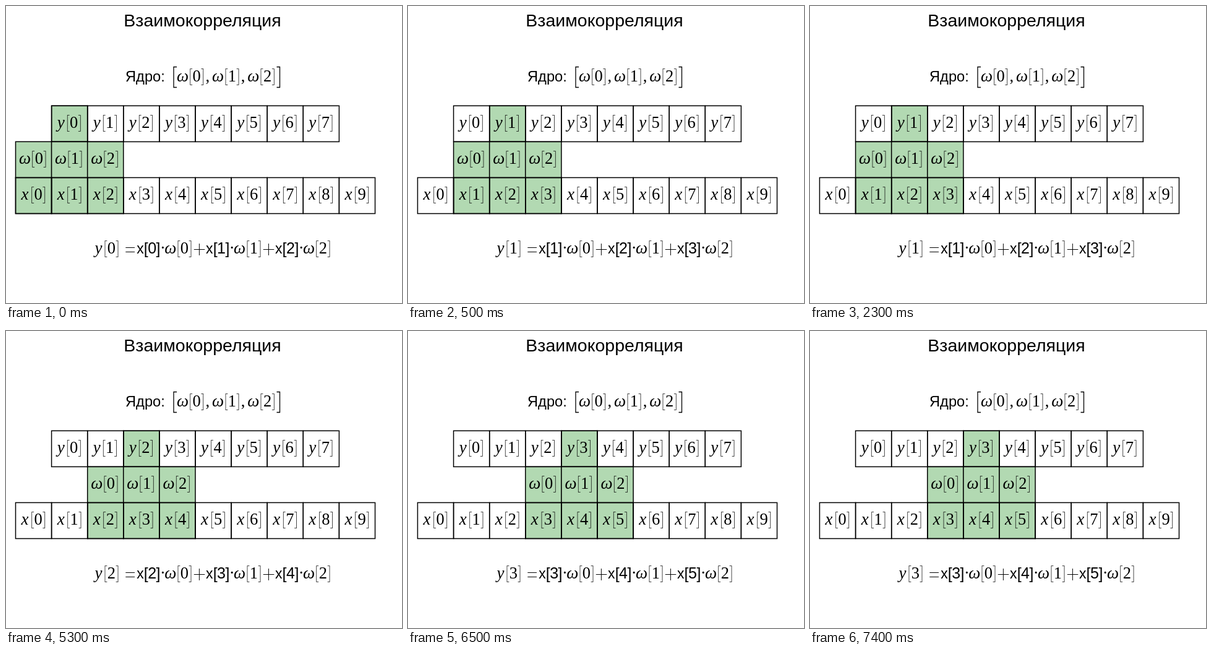
These frames come from a looping animation (640 by 480 pixels, 8 s). An HTML page:

```html
<!DOCTYPE html>
<html lang="ru">
<head>
<meta charset="utf-8">
<title>Взаимокорреляция</title>
<style>
  html, body { margin: 0; width: 100%; height: 100%; overflow: hidden; background: #fff; }
  svg { display: block; width: 640px; height: 480px; }
  text { font: 26.5px "Liberation Serif", serif; white-space: pre; }
  .var { font-size: 27px; font-style: italic; }
  .fence { font: 200 27px Roboto, sans-serif; }
  .op { font: 200 36px Roboto, sans-serif; }
  .sans { font: 25px "Liberation Sans", sans-serif; }
  .sansVar { font: 23px "Liberation Sans", sans-serif; }
  .mid { text-anchor: middle; }
  .cell { fill: none; stroke: #000; stroke-width: 1.5; }
  .on { fill: #b2d9b2; }
</style>
</head>
<body>
<svg id="stage" viewBox="0 0 640 480">
  <text class="sans mid" x="317.5" y="33" style="font-size:28.5px">Взаимокорреляция</text>
  <text class="sans" x="193" y="122" style="font-size:23.7px">Ядро:</text>
  <path d="M276 98.5h-5v33h5M437.5 98.5h5v33h-5" fill="none" stroke="#000" stroke-width="1.3"/>
</svg>
<script>
const stage = document.getElementById('stage');
const EM = 26.5, CELL = 58.1, LEFT = 15.5;
const ROWS = { y: 161.3, ω: 219.3, x: 277.4 };

// Advance in em, class and baseline shift of each math glyph
const MATH = {
  x: [.572, 'var', 0], y: [.526, 'var', 0], ω: [.658, 'var', 0],
  '[': [.278, 'fence', 2.2], ']': [.278, 'fence', 2.2],
  '+': [.778, 'op', 5.5], '=': [.778, 'op', 6],
  '·': [.278, '', 0], ',': [.445, '', 0], ' ': [.23, '', 0]
};
const SANS = { x: [.435, 'sansVar', 0], '[': [.27, 'sans', 1], ']': [.27, 'sans', 1] };
const metric = (ch, sans) => sans
  ? SANS[ch] || [.478, 'sans', 0]
  : MATH[ch] || [.5, '', 0];

function add(parent, tag, attrs) {
  const el = document.createElementNS('http://www.w3.org/2000/svg', tag);
  for (const key in attrs) el.setAttribute(key, attrs[key]);
  return parent.appendChild(el);
}

const width = str => [...str].reduce((sum, ch) => sum + metric(ch)[0] * EM, 0);

// Sets a run glyph by glyph and returns its right end
function setRun(parent, str, x, y, sans) {
  const line = add(parent, 'text', { class: 'mid' });
  for (const ch of str) {
    const [adv, cls, shift] = metric(ch, sans);
    const mid = ch === ',' ? .139 : adv / 2;
    add(line, 'tspan', { class: cls, x: x + mid * EM, y: y + shift }).textContent = ch;
    x += adv * EM;
  }
  return x;
}

function cell(parent, row, col, on) {
  add(parent, 'rect', {
    class: on ? 'cell on' : 'cell',
    x: LEFT + col * CELL, y: ROWS[row], width: CELL, height: CELL
  });
}

function label(parent, row, col, index) {
  const str = `${row}[${index}]`;
  setRun(parent, str, LEFT + (col + .5) * CELL - width(str) / 2, ROWS[row] + 35.7);
}

setRun(stage, 'ω[0],ω[1],ω[2]', 276.7, 122);

const kernel = add(stage, 'g');
cell(kernel, 'y', 1, true);
for (let i = 0; i < 3; i++) {
  cell(kernel, 'x', i, true);
  cell(kernel, 'ω', i, true);
  label(kernel, 'ω', i, i);
}
for (let i = 0; i < 10; i++) {
  cell(stage, 'x', i);
  label(stage, 'x', i, i);
}
for (let i = 0; i < 8; i++) {
  cell(stage, 'y', i + 1);
  label(stage, 'y', i + 1, i);
}

const formula = add(stage, 'g');
function show(step) {
  kernel.setAttribute('transform', `translate(${step * CELL})`);
  formula.replaceChildren();
  let x = setRun(formula, `y[${step}] =`, 142.5, 400);
  for (let i = 0; i < 3; i++) {
    x = setRun(formula, `x[${step + i}]`, x, 400, true);
    x = setRun(formula, `·ω[${i}]` + (i < 2 ? '+' : ''), x, 400);
  }
}

let shown = 0;
const start = performance.now();
function tick() {
  const t = (performance.now() - start) % 8000;
  const step = Math.floor((t + 2500) / 3000);
  if (step !== shown) show(shown = step);
  requestAnimationFrame(tick);
}
show(0);
tick();
</script>
</body>
</html>
```
